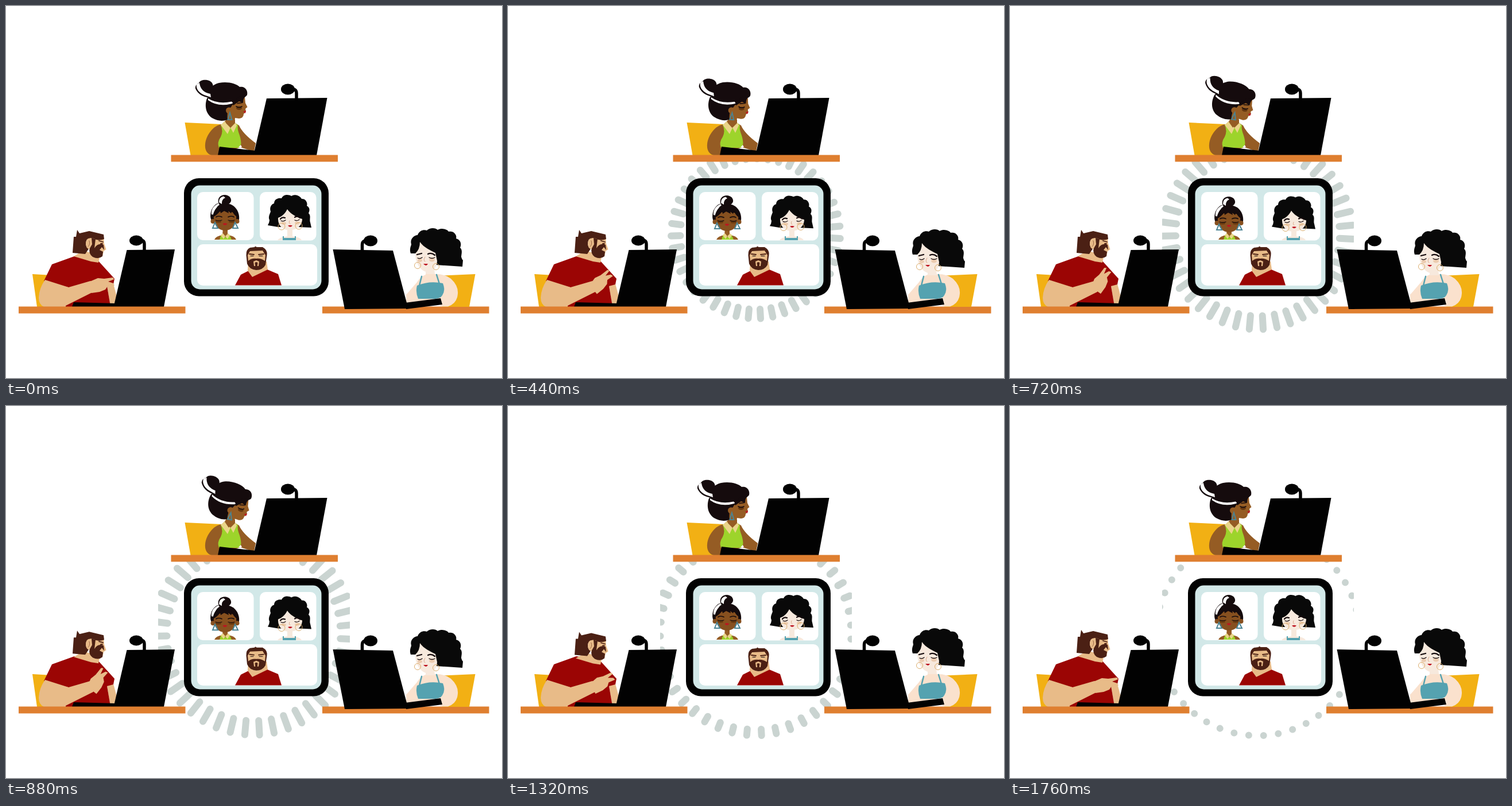
These frames come from a looping animation (864x648 px, 1800 ms). An HTML page:

```html
<!DOCTYPE html>
<html lang="en">
<head>
<meta charset="utf-8">
<title>Video call</title>
<style>
html, body { margin: 0; width: 100%; height: 100%; overflow: hidden; background: #fff; }
svg { display: block; width: 864px; height: 648px; }
.ink { fill: #020202; }
.hair { fill: #090909; }
.curl { fill: #150b0d; }
.brown { fill: #955c24; }
.face { fill: #87501f; }
.cream { fill: #fae1cd; }
.pale { fill: #f7e9dd; }
.tan { fill: #e8bb88; }
.bark { fill: #4b2014; }
.red { fill: #9b0504; }
.lip { fill: #bd1420; }
.teal { fill: #55a2b0; }
.lime { fill: #9dd42b; }
.collar { fill: #ead58a; }
.chair { fill: #f2b014; }
.desk { fill: #df7f30; }
.white { fill: #fff; }
.line { fill: none; stroke-linecap: round; stroke-linejoin: round; }
.jewel { fill: none; stroke: #4b8494; stroke-width: 2; }
.hoop { fill: none; stroke: #dcae6e; stroke-width: 1; }
.dark { stroke: #150b0d; }
.arm { fill: none; stroke: #020202; stroke-width: 5.5; }
</style>
</head>
<body>
<svg viewBox="0 0 864 648">
  <defs><clipPath id="stage"><rect x="265" y="264" width="334" height="340"/></clipPath></defs>

  <path id="rays" clip-path="url(#stage)" class="line" stroke="#cad4d1" stroke-width="12"/>

  <!-- tablet -->
  <rect class="ink" x="310" y="300" width="252" height="205.5" rx="26"/>
  <rect x="322.500" y="312.500" width="227" height="181" rx="15" fill="#d2e8e8"/>
  <g class="white">
    <rect x="333" y="324" width="98.5" height="84" rx="10"/>
    <rect x="442" y="324" width="98.5" height="84.5" rx="10"/>
    <rect x="333" y="415" width="209" height="72" rx="10"/>
  </g>

  <!-- first caller -->
  <path class="brown" d="M363 407Q365 401 377 399L378 386H386V399Q398 400 401 407Z"/>
  <path class="lime" d="M372 407L375 398L382 403L389 398L393 407Z"/>
  <path class="collar" d="M374 399L378 396L382 401L379 406ZM382 401L387 396L390 399L386 406Z"/>
  <g id="mini1">
    <path class="curl" d="M368 344Q385 341 396 348C404 354 407 364 406 372Q405 377 400 378H362C355 373 355 364 358 355Q362 347 368 344Z"/>
    <path class="curl" d="M370 343C368 334 374 329 381 329C388 329 393 334 392 340Q390 346 380 347Z"/>
    <path class="white" d="M371 342Q371 333 379 331.500L382 334Q375 337 376 345Z"/>
    <path class="white" d="M358 363Q357 350 370 344L372 346Q363 352 363 364Z"/>
    <circle class="face" cx="360.500" cy="375" r="4"/><circle class="face" cx="402.500" cy="375" r="4"/>
    <path class="face" d="M362 362Q381 352 401 362C403 382 393 391 381.500 391C370 391 360 382 362 362Z"/>
    <path class="curl" d="M360 368Q362 348 381 346Q400 347 403 368Q396 363 394 357L392 361L387 357L388 361L380 357L374 361L373 357Q368 364 360 368Z"/>
    <g fill="#68390f"><ellipse cx="370" cy="375.500" rx="5" ry="2.200"/><ellipse cx="393" cy="375.500" rx="5" ry="2.200"/></g>
    <path class="line dark" stroke-width="1.700" d="M366 367.500Q370 365 376 367.500M387 367.500Q393 365 397 367.500"/>
    <path class="line dark" stroke-width="1.200" d="M365 373Q370 375 376 373M387 373Q393 375 398 373"/>
    <path class="lip" d="M377.500 379.500Q381 377 385.500 379.500Q381 384 377.500 379.500Z"/>
    <path class="jewel" d="M364 377L360 387H369ZM399 377L395 387H404Z"/>
  </g>

  <!-- second caller -->
  <path class="pale" d="M473 408Q476 403 490 401V386H499V401Q513 403 515 408Z"/>
  <path class="teal" d="M482 408V401H484V404H503V401H505V408Z"/>
  <g id="mini2">
    <path class="hair" d="M456 382Q459 377 459 373C456 367 460 362 461 358C458 350 464 344 467 344C467 336 475 334 480 335C483 328 492 328 497 331C504 327 513 331 515 336C522 335 526 343 524 348C530 351 529 357 527 361C532 365 528 372 530 377L532 386L509 385H474Z"/>
    <path class="pale" d="M490 354C486 362 480 367 474 369C473 382 482 390.500 494 390.500C507 390.500 516 382 516 371C507 368 496 363 490 354Z"/>
    <g fill="#ecccb0"><ellipse cx="484" cy="378.500" rx="4" ry="2.500"/><ellipse cx="507" cy="378" rx="4" ry="2.500"/></g>
    <path class="line dark" stroke-width="2.200" d="M478 371Q481 367 486 369M503 368Q508 365 512 369"/>
    <path class="line dark" stroke-width="1.200" d="M479 374Q483 376 487 373M503 373Q507 375 511 372"/>
    <path class="line" stroke="#dba98d" d="M494 374Q492 379 495 379"/>
    <path class="lip" d="M491 382.500Q495 381 499 382.500Q495 387 491 382.500Z"/>
    <circle class="hoop" cx="480" cy="384" r="6"/><circle class="hoop" cx="510" cy="383" r="6"/>
  </g>

  <!-- third caller -->
  <path class="red" d="M399 486.500L409 468L425 460L455 459L474 467L480 486.500Z"/>
  <path class="tan" d="M422 445H454L456 459L429 472L421 461Z"/>
  <g id="mini3">
    <path class="bark" d="M418.500 434Q418 424 425 421L433 420L434 418.500L437 420L447 420Q456 425 454.500 434L452 451Q447 460 436 460Q424 459 420 449Z"/>
    <path class="tan" d="M421 434L425 427L447 426L452 434L451 444Q443 439 436 440Q428 439 422 444Z"/>
    <path class="line" stroke="#4b2014" stroke-width="1.800" d="M424 432L432 433M440 433L449 432"/>
    <path class="line dark" stroke-width="1" d="M426 435.500H431M441 435.500H447"/>
    <path class="tan" d="M431 445L436 443L441 445L440 453H432Z"/>
    <path class="bark" d="M433.500 447L436 446L438.500 447L437.500 455H434.500Z"/>
  </g>

  <!-- top worker -->
  <path class="chair" d="M311.500 203L376 206L364 260H321.500Z"/>
  <path class="brown" d="M384 198H399V204L406 208Q412 222 435 239L432 254L408 246L370 260H358C350 258 346 250 347 241C348 225 362 207 376 206Z"/>
  <path class="lime" d="M374 207L381 203L391 213L400 204L404 208C402 217 408 224 409 234Q411 244 405 247H371Q367 238 374 228Q379 218 374 207Z"/>
  <path class="white" d="M405 246L409 242L411 246Z"/>
  <path class="collar" d="M374 207L381 201L391 212L386 223ZM391 212L400 203L402 208L396 221Z"/>
  <g id="nod">
    <path class="brown" d="M383 204L385 184L399 164L416 159L417 169L420.500 176L417 179L418 184L414 188Q414 195 406 196L399 195L398 204L391 212Z"/>
    <path class="curl" d="M351 160C349 150 356 138 371 134C386 131 401 135 407 141C416 139 422 147 420 155Q417 160 411 159Q405 166 397 168Q391 178 386 184Q385 194 386 198Q373 203 359 195C347 187 346 172 350 161Z"/>
    <path class="curl" d="M330 144Q329 137 336 134C339 127 354 127 359 134Q362 139 360 146L363 160Q338 161 330 144Z"/>
    <path class="white" d="M332 136Q330 148 345 155L357 159L356 153Q339 150 337 134Z"/>
    <path class="white" d="M352 161Q370 172 393 166.500L396 169.500Q370 177 352 164Z"/>
    <circle class="brown" cx="388.500" cy="182" r="5.500"/>
    <path class="curl" d="M394 170L406 157L417 158Q413 160 413 169L406 166L396 173Z"/>
    <ellipse cx="406" cy="178" rx="5" ry="3" fill="#65370f"/>
    <path class="line dark" stroke-width="1.600" d="M401 175Q406 178 411 175M403 169.500L411 168.500"/>
    <path class="lip" d="M418 182L413 184L417 187Z"/>
    <path class="jewel" d="M390 186L386.500 198H393.500Z"/>
  </g>
  <path class="ink" d="M372 245L434 252V260H369Z"/>
  <path class="ink" d="M454 161L559.500 160L541 260H431Z"/>
  <ellipse class="ink" cx="491" cy="145" rx="12" ry="9.500"/>
  <path class="arm" d="M495 145Q506 143 506 152V162"/>
  <rect class="desk" x="287.500" y="259.500" width="290.500" height="11.800"/>

  <!-- left worker -->
  <path class="chair" d="M46 467L80 469L72 524H54Z"/>
  <path class="tan" d="M176 488L187 484L197 521L182 524Z"/>
  <path class="red" d="M66 479L80 450L119 436L158 441L169 453L189 475L187 485L176 488L181 517V524H100L108 490Z"/>
  <path class="tan" d="M68 477L109 490L147 479L158 486L152 498L104 522V524H66Q57 520 57 508Q58 491 68 477Z"/>
  <g id="hand"><path class="tan" d="M146 480L160 474L171 475L186 473L188.500 476L178 480L187 483L189 487L177 488L173 494L163 498L149 500Z"/></g>
  <g id="headM">
    <path class="tan" d="M135 426L148 430L163 438L161 447L148 445L118 436Z"/>
    <path class="tan" d="M140 403H170L171 414L174.500 424L170 427L168 436H148Z"/>
    <path class="bark" d="M118 402L122 402L124 390L128 396L145 392L170 398L171 406Q160 410 153 405L148 404Q139 404 139 415Q140 420 144 423L138 432L116 430Z"/>
    <ellipse class="tan" cx="144" cy="414" rx="5" ry="9"/>
    <path class="bark" d="M149 404L156 406L154 422Q160 412 170 416L171 425L167 420L163 425L169 428L168 436Q161 442 151 437Q143 431 146 422L150 415Z"/>
    <path class="line" stroke="#4b2014" stroke-width="1.800" d="M162 409L169 411M165 414H168"/>
    <path class="line" stroke="#9d6746" d="M145 409Q147 416 143 419"/>
  </g>
  <path class="ink" d="M118 516L190 518V524H115Z"/>
  <path class="ink" d="M210.500 425L294 424L275 524H187.500Z"/>
  <ellipse class="ink" cx="227" cy="408.500" rx="12" ry="9"/>
  <path class="arm" d="M231 408.500Q241 406 241 415V426"/>
  <rect class="desk" x="22" y="523.500" width="290.500" height="12"/>

  <!-- right worker -->
  <rect class="desk" x="551" y="523.500" width="290.500" height="12"/>
  <path class="chair" d="M750 470L817.500 467L807 524H760Z"/>
  <path class="cream" d="M731 455H746V467Q763 466 775 475Q788 487 787 501Q786 518 770 523.500H757L756 508L697 520V503L716 481Q722 471 731 468Z"/>
  <path class="teal" d="M716 487Q738 478 761 483Q766 495 760 504Q757 510 744 510H718Q713 498 716 487Z"/>
  <path class="line" stroke="#55a2b0" stroke-width="2.500" d="M724 471L720 487M750 468L755 484"/>
  <g id="headW">
    <path class="hair" d="M705 431C702 422 706 418 706 415C703 406 711 399 717 399C720 390 729 389 733 391C738 386 748 386 752 390C759 386 769 389 771 393C780 391 786 399 784 405C792 407 794 415 791 421C796 425 793 433 793 437Q794 441 796 443L795 454L750 451L718 431Z"/>
    <path class="pale" d="M721 411C728 421 740 426 748 430L751 444C751 457 741 464 732 463C722 461 713 448 713 431Q721 424 721 411Z"/>
    <path class="pale" d="M731 456H746L747 467H731Z"/>
    <g fill="#ecccb0"><ellipse cx="721" cy="443" rx="4" ry="3"/><ellipse cx="742" cy="442" rx="5" ry="3.500"/></g>
    <path class="line dark" stroke-width="2.300" d="M716 433L724 431M735 432Q741 429 747 434"/>
    <path class="line dark" stroke-width="1.300" d="M717 439Q721 441 725 438M737 438Q742 441 747 438"/>
    <path class="line" stroke="#dba98d" d="M730 437Q726 444 730 445"/>
    <path class="lip" d="M727 449Q731 449 735 449Q732 455 727 449Z"/>
    <circle class="hoop" cx="717" cy="452" r="5.500"/><circle class="hoop" cx="749" cy="454" r="5.500"/>
  </g>
  <path class="ink" d="M695 517L757 509L760 520L697 528Z"/>
  <path class="ink" d="M569.500 424L674 426L698 517V527L590 528Z"/>
  <ellipse class="ink" cx="635" cy="409" rx="12" ry="9.500"/>
  <path class="arm" d="M631 409.500Q620.500 407 620.500 416V426"/>
</svg>

<script>
const LOOP = 1800, STEP = 40, COUNT = 43;
const CX = 431.5, CY = 397.3;
const $ = id => document.getElementById(id);

// Radius of each ray end over time: [ms, radius]
const outer = [[0, 85], [280, 136], [600, 159], [880, 176], [960, 177], [1800, 177]];
const inner = [[0, 85], [280, 126], [600, 136], [880, 151], [1040, 157], [1320, 166], [1760, 177], [1800, 177]];

function track(keys, t) {
  const i = Math.max(1, keys.findIndex(k => k[0] >= t));
  const [t0, a] = keys[i - 1], [t1, b] = keys[i];
  return a + (b - a) * (t - t0) / (t1 - t0);
}

function ease(t, from, to) {
  const x = Math.min(1, Math.max(0, (t - from) / (to - from)));
  return (1 - Math.cos(Math.PI * x)) / 2;
}

// 0 to 1 during a..b, back to 0 during c..d
const swing = (t, a, b, c, d) => ease(t, a, b) - ease(t, c, d);

const turn = (id, deg, x, y) => $(id).setAttribute("transform", `rotate(${deg} ${x} ${y})`);
const drop = (id, y) => $(id).setAttribute("transform", `translate(0 ${y})`);

function drawRays(t) {
  const r0 = track(inner, t), r1 = track(outer, t);
  let d = "";
  for (let i = 0; i < COUNT; i++) {
    const a = (3.3 + i * 360 / COUNT) * Math.PI / 180;
    const at = r => `${(CX + r * Math.sin(a)).toFixed(2)} ${(CY + r * Math.cos(a)).toFixed(2)}`;
    d += `M${at(r0)}L${at(r1 + 0.01)}`;
  }
  $("rays").setAttribute("d", d);
}

function draw(t) {
  drawRays(t);
  const nod = swing(t, 240, 820, 850, 1310);
  turn("nod", 11 * nod, 391, 195);
  drop("mini1", 3.3 * nod);
  drop("mini2", 2.5 * swing(t, 260, 600, 880, 1260));
  drop("headW", 2 * swing(t, 0, 340, 880, 1200));
  const dip = swing(t, 760, 1060, 1320, 1720);
  drop("headM", 3.5 * dip);
  drop("mini3", 2 * dip);
  turn("hand", -46 * swing(t, 0, 730, 730, 1760), 155, 490);
}

const start = performance.now();
function tick() {
  const t = (performance.now() - start) % LOOP;
  draw(Math.floor(t / STEP) * STEP);
  requestAnimationFrame(tick);
}
tick();
</script>
</body>
</html>
```
